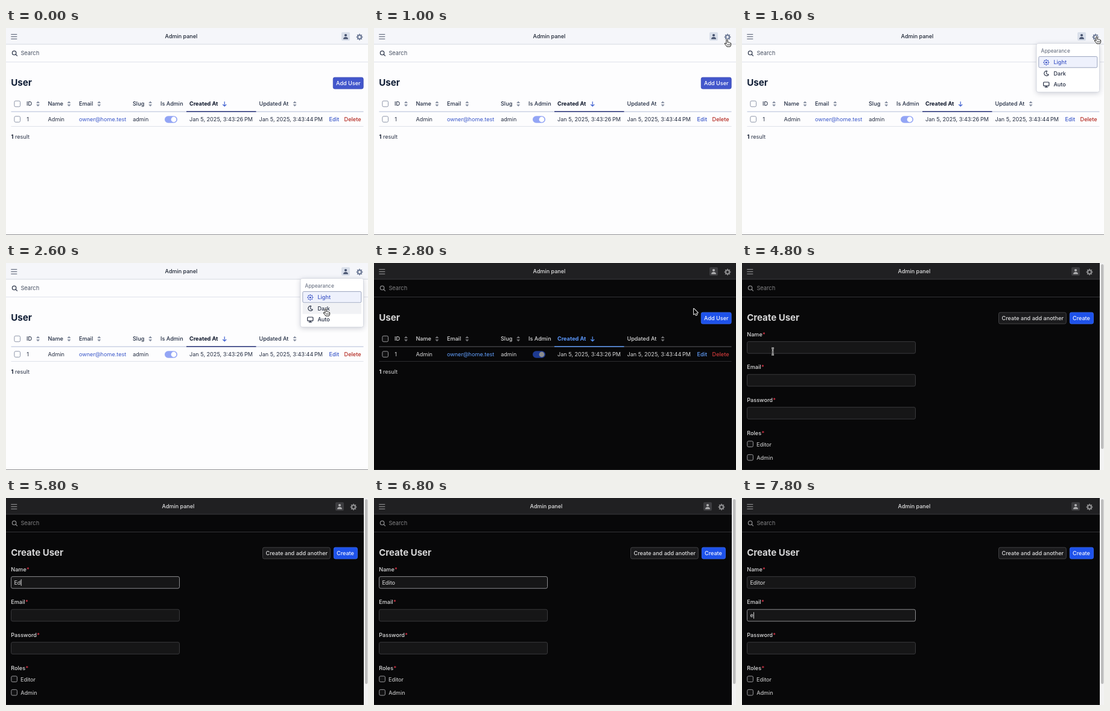
Recreate the animation shown at these times as an HTML page with a canvas. Size 600 by 344 pixels, loop 8 s.

```html
<!DOCTYPE html>
<html lang="en">
<head>
<meta charset="utf-8">
<title>Admin panel</title>
<style>
  html, body { margin: 0; width: 100%; height: 100%; overflow: hidden; background: #fdfdfe; }
  canvas { display: block; width: 100vw; height: 100vh; }
</style>
</head>
<body>
<canvas id="stage"></canvas>
<script>
const W = 600, H = 344, LOOP = 8000, STEP = 200;
const canvas = document.getElementById('stage');
const ctx = canvas.getContext('2d');
const ratio = window.devicePixelRatio || 1;
canvas.width = W * ratio;
canvas.height = H * ratio;

const LIGHT = {
  body: '#fdfdfe', header: '#f5f6fa', headerLine: '#d6d9e2', searchLine: '#e0e2ea', bottom: '#8e8e92',
  bar: '#666e80', brand: '#1c2433', search: '#454e60', lens: '#333c50',
  avatar: '#d9dfea', person: '#475370', gear: '#75819c',
  title: '#0f1d35', th: '#1f2a40', active: '#0b1428', arrow: '#3d5fd0', activeLine: '#363f80',
  thLine: '#d0d6e6', rowLine: '#dfe2ea', sort: '#8891a3', text: '#252e42', strong: '#111a2e',
  box: '#8d95a8', boxFill: '#ffffff', link: '#3a57c9', remove: '#b3261e',
  toggle: '#93a5f5', knob: '#ffffff', button: '#4357cc', buttonLine: '#3b4bb8', buttonText: '#ffffff'
};
const DARK = {
  body: '#080809', header: '#202022', headerLine: '#3b3b3e', searchLine: '#343437', bottom: '#1a1a1b',
  bar: '#8a8a8c', brand: '#e2e2e3', search: '#838385', lens: '#8a8a8c',
  avatar: '#3c3c3f', person: '#b0b0b2', gear: '#88888a',
  title: '#d6d6d7', th: '#d8d8d9', active: '#5a96fa', arrow: '#5a96fa', activeLine: '#5a90e4',
  thLine: '#3c3c40', rowLine: '#2c2c2f', sort: '#707073', text: '#d8d8d9', strong: '#e2e2e3',
  box: '#98989b', boxFill: '#111112', link: '#62a0ff', remove: '#cf3a3a',
  toggle: '#1d3a92', knob: '#8c8c8e', button: '#1e52ea', buttonLine: '#3164ee', buttonText: '#f4f6ff'
};

const HAND = new Path2D('M-1.1 1Q0-.7 1.2 1V5Q2.5 4 3.4 5.2Q4.6 4.5 5.3 5.8Q6.7 5.4 6.6 7V9Q6.4 10.5 5.4 12H0Q-1.5 10-4 7Q-3.6 5.5-2.4 6.3L-1.1 7.6Z');
const ARROW = new Path2D('M0 0V9.4L2.2 7.4 3.8 10.8 5.4 10 3.9 6.9 6.8 6.7Z');
const BEAM = new Path2D('M-2-5.5Q0-5.5 0-4Q0-5.5 2-5.5M0-4V4M-2 5.5Q0 5.5 0 4Q0 5.5 2 5.5M-1.3 1H1.3');

// time, x, y of the pointer
const POINTER = [
  [400, 500, 172], [600, 532, 110], [800, 566, 50], [1000, 585, 19], [1200, 588, 14],
  [1600, 588, 14], [2000, 570, 40], [2400, 532, 72], [2600, 530, 76], [2800, 530, 76],
  [3200, 545, 85], [3600, 565, 92], [4000, 564, 92], [4200, 460, 102], [4400, 230, 130],
  [4600, 78, 145], [4800, 51, 147], [5000, 51, 147]
];

function text(str, x, y, color, size = 9.1, weight = 400) {
  ctx.font = `${weight} ${size}px Inter, sans-serif`;
  ctx.fillStyle = color;
  ctx.fillText(str, x, y);
  return ctx.measureText(str).width;
}

function rect(x, y, w, h, color) {
  ctx.fillStyle = color;
  ctx.fillRect(x, y, w, h);
}

function panel(x, y, w, h, r, fill, line) {
  ctx.beginPath();
  ctx.roundRect(x, y, w, h, r);
  ctx.fillStyle = fill;
  ctx.fill();
  if (line) outline(line, 1);
}

function outline(color, width, path) {
  ctx.strokeStyle = color;
  ctx.lineWidth = width;
  path ? ctx.stroke(path) : ctx.stroke();
}

function shape(points, color) {
  ctx.beginPath();
  points.forEach(([x, y]) => ctx.lineTo(x, y));
  ctx.fillStyle = color;
  ctx.fill();
}

function disc(x, y, r, color) {
  ctx.beginPath();
  ctx.arc(x, y, r, 0, 7);
  ctx.fillStyle = color;
  ctx.fill();
}

function gear(x, y, r, hole, color) {
  ctx.beginPath();
  for (let i = 0; i < 32; i++) {
    const a = (i - 0.5) * Math.PI / 16;
    const d = i % 4 < 2 ? r : r * 0.76;
    ctx.lineTo(x + Math.cos(a) * d, y + Math.sin(a) * d);
  }
  ctx.closePath();
  ctx.moveTo(x + hole, y);
  ctx.arc(x, y, hole, 0, 7);
  ctx.fillStyle = color;
  ctx.fill('evenodd');
}

function topBar(c, right, titleX) {
  rect(0, 0, W, H, c.body);
  rect(0, 0, W, 27, c.header);
  rect(0, 26.5, W, 1, c.headerLine);
  rect(0, 56, W, 1, c.searchLine);
  for (const y of [10, 13.8, 17.6]) rect(8.3, y, 10, 1.2, c.bar);
  text('Admin panel', titleX, 17.3, c.brand, 9, 500);

  panel(right - 44, 7, 14, 14, 2, c.avatar);
  disc(right - 37, 12, 2.1, c.person);
  ctx.beginPath();
  ctx.ellipse(right - 37, 18.5, 4, 3.5, 0, Math.PI, 0);
  ctx.fill();
  gear(right - 14, 15, 5.5, 1.9, c.gear);

  ctx.beginPath();
  ctx.arc(13.6, 41.4, 3.2, 0, 7);
  ctx.moveTo(16, 43.8);
  ctx.lineTo(18.8, 46.6);
  outline(c.lens, 1.3);
  text('Search', 24.4, 45.2, c.search, 9.25);
  rect(0, 343, W, 1, c.bottom);
}

function sorter(x, c) {
  shape([[x - 3, 124.9], [x, 121.6], [x + 3, 124.9]], c.sort);
  shape([[x - 3, 127.1], [x, 130.4], [x + 3, 127.1]], c.sort);
}

function checkbox(x, y, c) {
  panel(x, y, 9.6, 9.6, 2, c.boxFill, c.box);
}

function button(label, x, w, textX, fill, line, color) {
  panel(x, 82.2, w, 18.8, 2.5, fill, line);
  text(label, textX, 94.9, color, 9.1, 500);
}

function listPage(c) {
  topBar(c, W, 263.6);
  text('User', 8.2, 95.7, c.title, 15.2, 700);
  button('Add User', 542.3, 49.8, 547, c.button, c.buttonLine, c.buttonText);

  rect(8.5, 138.2, 584, 1.6, c.thLine);
  rect(299, 138, 115.5, 1.6, c.activeLine);
  rect(8.5, 163, 584, 1, c.rowLine);
  checkbox(13.9, 121.2, c);
  checkbox(13.9, 146.8, c);

  const heads = [['ID', 33.9, 53], ['Name', 69.4, 104.4], ['Email', 120.9, 154.3],
    ['Slug', 210, 239.2], ['Is Admin', 256], ['Updated At', 419.4, 478.6]];
  for (const [label, x, sortX] of heads) {
    text(label, x, 129.2, c.th, 9.1, 500);
    if (sortX) sorter(sortX, c);
  }
  text('Created At', 303.9, 129.2, c.active, 9.1, 700);
  ctx.beginPath();
  ctx.moveTo(362.2, 122.3);
  ctx.lineTo(362.2, 130);
  ctx.moveTo(359.2, 127);
  ctx.lineTo(362.2, 130);
  ctx.lineTo(365.2, 127);
  outline(c.arrow, 1.2);

  const cells = [['1', 34.3], ['Admin', 69.6], ['admin', 210.2],
    ['Jan 5, 2025, 3:43:26\u2009PM', 304], ['Jan 5, 2025, 3:43:44\u2009PM', 419.5]];
  for (const [value, x] of cells) text(value, x, 155.1, c.text);
  text('owner@home.test', 121, 155.1, c.link);
  panel(263, 146.3, 21, 11.4, 5.7, c.toggle);
  disc(278, 152, 4.4, c.knob);
  text('Edit', 535.6, 155.1, c.link, 9.1, 500);
  text('Delete', 560.6, 155.1, c.remove, 9.1, 500);

  const w = text('1', 8.4, 183.8, c.strong, 9.1, 700);
  text(' result', 8.4 + w, 183.8, c.text);
}

function menu(hoverDark) {
  ctx.save();
  ctx.shadowColor = 'rgba(30,40,70,.22)';
  ctx.shadowBlur = 8 * ratio;
  ctx.shadowOffsetY = 2 * ratio;
  panel(488, 25.5, 104.5, 81, 3, '#fff');
  ctx.restore();
  panel(488, 25.5, 104.5, 81, 3, '#fff', '#d6d9e1');
  text('Appearance', 495.6, 41.4, '#596275', 8.4);

  panel(491.8, 47.4, 97, 18.4, 2, '#eef1fc', '#99a3bd');
  if (hoverDark) rect(491.5, 66.6, 97.5, 18, '#f1f2f5');
  const blue = '#3f57c6', ink = '#242d42';
  gear(504.3, 57.2, 5, 3.2, blue);
  disc(504.3, 57.2, 1.5, blue);
  text('Light', 516.4, 60.1, blue, 9.1, 500);

  ctx.beginPath();
  ctx.arc(504.8, 75.4, 4, 0.45, 4.9);
  ctx.quadraticCurveTo(502.6, 77.6, 508.4, 77.1);
  outline(ink, 1.1);
  text('Dark', 516.4, 78.7, ink, 9.1, 500);

  ctx.beginPath();
  ctx.roundRect(499.7, 90, 9.2, 6.2, 1);
  outline(ink, 1.2);
  rect(503.5, 96.4, 1.6, 2, ink);
  rect(501.6, 97.7, 5.4, 1.1, ink);
  text('Auto', 516.4, 97.2, ink, 9.1, 500);
}

function field(label, y, value, focused, caret) {
  const w = text(label, 8.3, y, '#dededf', 9.1, 500);
  text('*', 8.6 + w, y, '#e0354a', 9.1, 500);
  if (value === null) return;
  panel(8.5, y + 8.8, 279, 19.6, 2.5, '#161617', focused ? '#8c8c8f' : '#39393c');
  const end = 13.4 + text(value, 13.4, y + 21.8, '#e2e2e3');
  if (caret) rect(end + 0.3, y + 13.3, 0.9, 10.8, '#e8e8e8');
}

function formPage(t) {
  const c = DARK;
  topBar(c, 590, 258.6);
  text('Create User', 8.2, 95.7, c.title, 15, 700);
  button('Create and add another', 425.5, 111.8, 430.6, '#1b1b1d', '#424245', '#e0e0e1');
  button('Create', 543.4, 39, 548, c.button, c.buttonLine, c.buttonText);

  const letters = t < 5600 ? 0 : t < 6200 ? (t - 5400) / 200 : t < 6600 ? 4 : t < 7200 ? 5 : 6;
  const onName = t >= 5000 && t < 7400;
  const onEmail = t >= 7400;
  field('Name', 121.8, 'Editor'.slice(0, letters), onName, onName && (t < 6800 || t >= 7200));
  field('Email', 176.4, t >= 7800 ? 'e' : '', onEmail, onEmail && t !== 7600);
  field('Password', 230.9, '', false, false);
  field('Roles', 285.5, null);
  checkbox(8.8, 296, c);
  text('Editor', 24, 304.6, c.text);
  checkbox(8.8, 318.4, c);
  text('Admin', 24.2, 327, c.text);

  rect(593, 0, 7, H, '#f2f2f2');
  panel(595, 2, 4.4, 307, 2.2, '#bdbdbd');
}

function pointerAt(t) {
  if (t < POINTER[0][0] || t > 5000) return null;
  const i = Math.max(1, POINTER.findIndex(k => k[0] >= t));
  const [t0, x0, y0] = POINTER[i - 1], [t1, x1, y1] = POINTER[i];
  const p = (t - t0) / (t1 - t0);
  return { x: x0 + (x1 - x0) * p, y: y0 + (y1 - y0) * p };
}

function pointer({ x, y }, t) {
  const onGear = t < 2800 && x > 580 && y < 22;
  const onMenu = t >= 1400 && t < 2800 && y > 47;
  const onButton = t > 2800 && x > 543 && y > 82 && y < 101;
  const onField = t >= 4000 && x < 287 && y > 130;
  ctx.save();
  ctx.translate(x, y);
  ctx.lineJoin = 'round';
  if (onField) {
    outline('#f2f2f2', 2.3, BEAM);
    outline('#222', 0.8, BEAM);
  } else if (onGear || onMenu || onButton) {
    outline('#fff', 2.2, HAND);
    ctx.fillStyle = '#fff';
    ctx.fill(HAND);
    outline('#111', 1, HAND);
    ctx.beginPath();
    for (const dx of [1, 2.8, 4.5]) {
      ctx.moveTo(dx, 7.4);
      ctx.lineTo(dx, 10);
    }
    outline('#111', 0.7);
  } else {
    outline('#fff', 1.8, ARROW);
    ctx.fillStyle = '#050505';
    ctx.fill(ARROW);
  }
  ctx.restore();
}

function draw(time) {
  const t = Math.floor((time % LOOP) / STEP) * STEP;
  ctx.setTransform(ratio, 0, 0, ratio, 0, 0);
  const spot = pointerAt(t);
  if (t >= 4000) formPage(t);
  else listPage(t < 2800 ? LIGHT : DARK);
  if (t >= 1400 && t < 2800) menu(spot.y > 66);
  if (spot) pointer(spot, t);
}

const start = performance.now();
function tick() {
  draw(performance.now() - start);
  requestAnimationFrame(tick);
}
tick();
</script>
</body>
</html>
```
